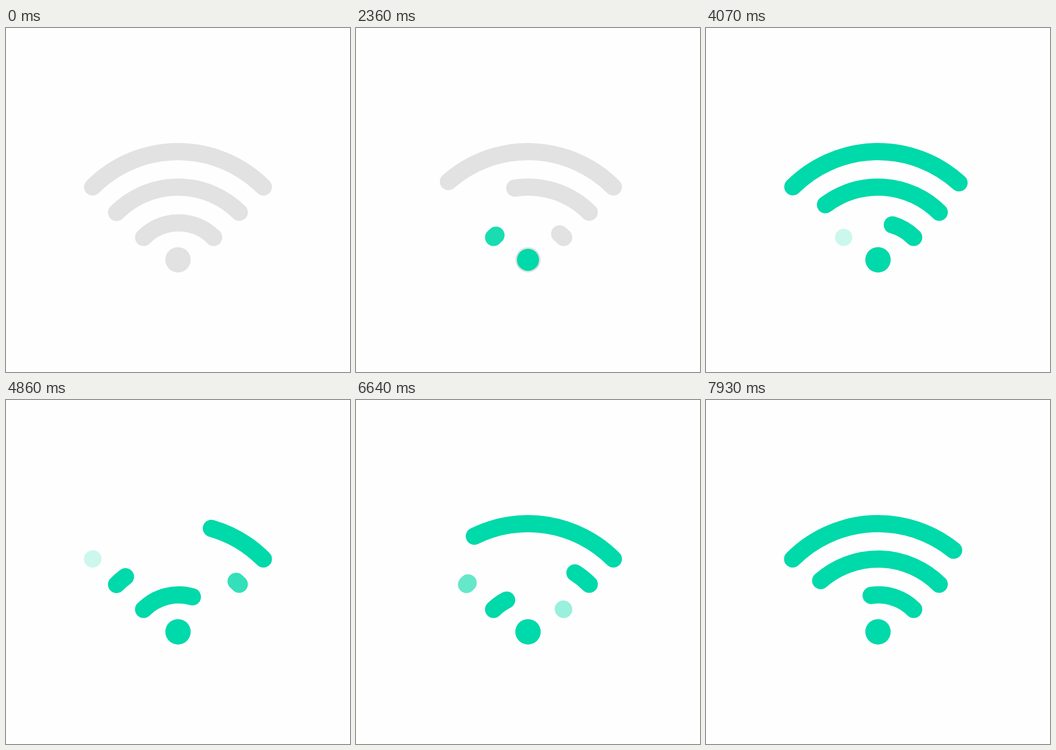
An HTML page for the animation above (8000 ms loop, 640 px wide and 640 px high).

```html
<!DOCTYPE html>
<html lang="en">
<head>
<meta charset="utf-8">
<title>Wireless signal</title>
<style>
  html, body { margin: 0; width: 100%; height: 100%; overflow: hidden; background: #fefefe; }
  svg { display: block; width: 100vw; height: 100vh; }
  path { fill: none; stroke-width: 32; stroke-linecap: round; }
</style>
</head>
<body>
<svg viewBox="0 0 640 640">
  <circle cx="320" cy="431.3" r="23.6" fill="#e2e2e2"/>
  <circle id="dot" cx="320" cy="431.3" r="0" fill="#00d9a9"/>
</svg>
<script>
const LOOP = 8000, FPS = 14, TICK = 40;
const SWEEP = 1600, FADE = 400, STAGGER = 400, CYCLE = 2000, HOLD = 1200;
const GRAY = "#e2e2e2", GREEN = "#00d9a9";

// Angles are in degrees from straight up.
const ARCS = [
  { x: 321.2, y: 454.8, r: 92.2, from: -45, to: 45 },
  { x: 320, y: 458, r: 162, from: -44.9, to: 44.7 },
  { x: 320, y: 454.6, r: 224.6, from: -45, to: 45 }
];

const svg = document.querySelector("svg");
const dot = document.getElementById("dot");
const clamp = v => Math.min(1, Math.max(0, v));

// cubic-bezier(.75, 0, .25, 1)
function ease(x) {
  if (x <= 0) return 0;
  if (x >= 1) return 1;
  let lo = 0, hi = 1;
  for (let i = 0; i < 24; i++) {
    const u = (lo + hi) / 2;
    if (u * (2.25 + u * (2.5 * u - 3.75)) < x) lo = u; else hi = u;
  }
  return lo * lo * (3 - 2 * lo);
}

function point(arc, part) {
  const a = (arc.from + (arc.to - arc.from) * part) * Math.PI / 180;
  return (arc.x + arc.r * Math.sin(a)).toFixed(3) + " " + (arc.y - arc.r * Math.cos(a)).toFixed(3);
}

const strokes = [];
ARCS.forEach((arc, i) => {
  for (let round = 0; round < 4; round++) {
    const node = document.createElementNS("http://www.w3.org/2000/svg", "path");
    node.setAttribute("stroke", round ? GREEN : GRAY);
    svg.append(node);
    const begin = round * CYCLE + i * STAGGER;
    strokes.push({ arc, node, drawAt: round ? begin : -SWEEP, eraseAt: begin + HOLD });
  }
});

function render(t) {
  for (const { arc, node, drawAt, eraseAt } of strokes) {
    const opacity = Math.min(clamp((t - drawAt) / FADE), clamp((eraseAt + SWEEP - t) / FADE));
    node.style.display = opacity > 0 ? "" : "none";
    if (!opacity) continue;
    const start = Math.min(0.999, ease((t - eraseAt) / SWEEP));
    const end = Math.max(start + 0.001, ease((t - drawAt) / SWEEP));
    node.setAttribute("d", `M${point(arc, start)}A${arc.r} ${arc.r} 0 0 1 ${point(arc, end)}`);
    node.setAttribute("stroke-opacity", opacity);
  }
  dot.setAttribute("r", 23.6 * ease((t - 1310) / SWEEP));
}

// The picture is held at 14 steps a second, each showing a moment on a 40 ms grid.
function stepped(ms) {
  const step = Math.floor((ms + 5) * FPS / 1000);
  const shown = Math.round(step * 100 / FPS) * 10;
  return Math.ceil(shown / TICK) * TICK;
}

const origin = performance.now();
function frame() {
  render(stepped((performance.now() - origin) % LOOP));
  requestAnimationFrame(frame);
}
frame();
</script>
</body>
</html>
```
